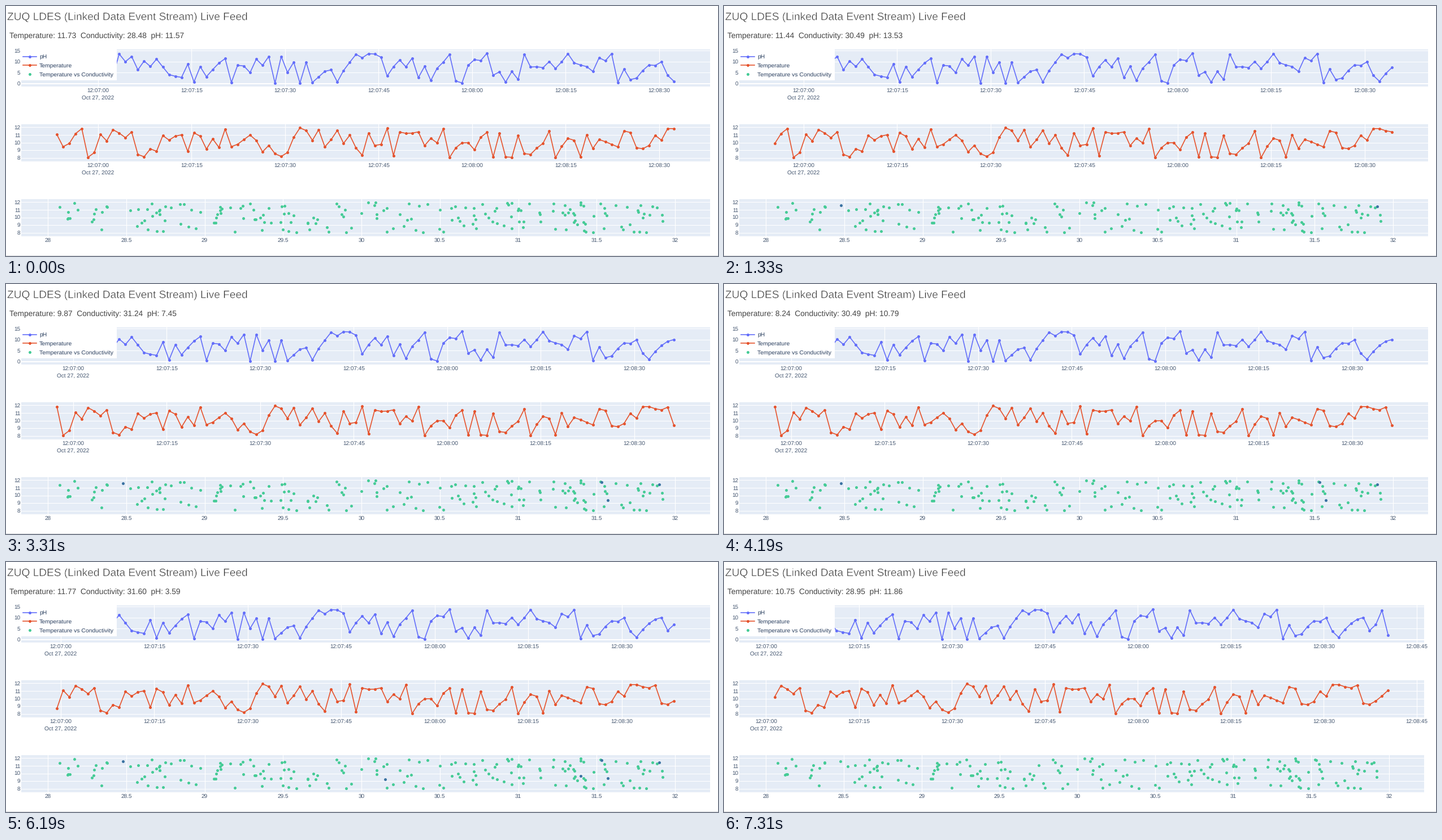
Recreate the animation shown at these times as a matplotlib script. Size 1260 px wide and 444 px high, loop 8000 ms.

```python
import numpy as np
import matplotlib.pyplot as plt
from matplotlib.animation import FuncAnimation
from matplotlib.patches import Rectangle
from matplotlib.patheffects import Stroke

W, H, DPI = 1260, 444, 72
LOOP, STEP = 8000, 20
HISTORY, WINDOW = 192, 100      # readings at the start, readings per line chart
LEFT, RIGHT, DEPTH = 27, 1246, 66
BLUE, RED, GREEN, FRESH = "#636efa", "#e5532d", "#45cb96", "#3a72a2"
PANEL, INK = "#e5ecf6", "#43556f"

plt.rcParams["font.family"] = "Liberation Sans"
plt.rcParams["text.hinting"] = "none"

# Readout: (time in ms, temperature, conductivity, pH)
READOUT = [
    (0, 11.73, 28.48, 11.57), (250, 9.62, 29.15, 6.84),
    (1180, 11.44, 30.49, 13.53), (2320, 11.02, 28.32, 4.33),
    (3180, 9.87, 31.24, 7.45), (4190, 8.24, 30.49, 10.79),
    (5180, 9.44, 29.79, 5.16), (6190, 11.77, 31.60, 3.59),
    (7180, 10.75, 28.95, 11.86)]
PLOT_TIMES = [320, 1330, 2320, 3310, 4320, 5310, 6320, 7310]
REDRAW = 7                      # from this update on, the layout is rebuilt
EDGES = {7: 1228, 8: 1239}

# One reading per second: random history, then the readings that arrive live.
rng = np.random.default_rng(27)


def readings(low, high, live):
    return np.append(rng.uniform(low, high, HISTORY), live)


ph = readings(0.2, 13.8, [4.6, 7.3, 9.2, 10.0, 4.2, 6.8, 13.3, 2.1])
temp = readings(8, 11.95, [11.55, 11.4, 11.75, 9.4, 9.25, 9.7, 10.35, 11.1])
cond = readings(28.05, 32,
                [28.48, 31.9, 31.53, 31.57, 30.15, 31.4, 30.75, 29.75])


def ph_y(v):
    return 138.2 - 3.95 * v


def temp_y(v):
    return 270 - 13.65 * (v - 8)


def scatter_y(v):
    return 403 - 13.7 * (v - 8)


def cond_x(v):
    return 74 + 277.5 * (v - 28)


fig = plt.figure(figsize=(W / DPI, H / DPI), dpi=DPI, facecolor="white")
ax = fig.add_axes([0, 0, 1, 1])
ax.set(xlim=(0, W), ylim=(H, 0))
ax.axis("off")


def label(x, y, s="", size=10, color=INK, ha="center", **kw):
    return ax.text(x, y, s, size=size, color=color, ha=ha, va="baseline",
                   zorder=6, **kw)


def box(x, y, w, h, color, z):
    return ax.add_patch(Rectangle((x, y), w, h, fc=color, lw=0, zorder=z))


def series(color, ls="-", z=3):
    return ax.plot([], [], color=color, ls=ls, lw=1.65, marker="o", ms=5,
                   mew=0, zorder=z)[0]


def panel(top, ticks, to_y):
    """Background with labelled horizontal grid lines."""
    bg = box(LEFT, top, RIGHT - LEFT, DEPTH, PANEL, 0)
    rows = []
    for v in ticks:
        y = to_y(v)
        rows += ax.plot([LEFT, RIGHT], [y, y], color="white",
                        lw=1 if v else 2, zorder=1)
        label(25.5, y + 3.8, str(v), ha="right")
    return bg, rows


def columns(top, names):
    """Vertical grid lines, each with its label below the panel."""
    return [(ax.plot([0, 0], [top, top + DEPTH], color="white", lw=1.2,
                     zorder=1)[0], label(0, top + 77.2, s)) for s in names]


def place(column, x, edge):
    line, name = column
    line.set_xdata([x, x])
    name.set_x(x)
    for part in column:
        part.set_visible(x < edge)


label(2, 25, "ZUQ LDES (Linked Data Event Stream) Live Feed", 19.1, "#333333",
      "left", path_effects=[Stroke(linewidth=0.5, foreground="white")])
info = label(5.5, 57, "", 13.7, "#444444", "left")
box(0, 443, W, 1, "#d8dadd", 0)

panels = [panel(77, range(0, 16, 5), ph_y),
          panel(210, range(8, 13), temp_y),
          panel(343, range(8, 13), scatter_y)]

times = [f"12:{7 + s // 60:02d}:{s % 60:02d}" for s in range(0, 106, 15)]
clocks = [(columns(top, times), label(0, top + 90, "Oct 27, 2022"))
          for top in (77, 210)]
cond_ticks = np.arange(28, 32.1, 0.5)
cond_cols = columns(343, [f"{v:g}" for v in cond_ticks])

ph_line, temp_line = series(BLUE), series(RED)
dots, fresh = series(GREEN, "none"), series(FRESH, "none", 4)

# Legend
box(LEFT, 76, 169, 56, "white", 5)
for y, color, name in [(89.5, BLUE, "pH"), (105.3, RED, "Temperature"),
                       (121, GREEN, "Temperature vs Conductivity")]:
    if color != GREEN:
        ax.plot([30, 54], [y, y], color=color, lw=1.65, zorder=6)
    ax.plot([42], [y], "o", color=color, ms=5, mew=0, zorder=6)
    label(59, y + 3.7, name, 10.35, "#2a3f5f", "left")


def update(n):
    t = n * STEP + STEP - 1
    _, t_now, c_now, p_now = [r for r in READOUT if r[0] <= t][-1]
    info.set_text(f"Temperature: {t_now:.2f}  Conductivity: {c_now:.2f}"
                  f"  pH: {p_now:.2f}")

    k = sum(t >= p for p in PLOT_TIMES)
    edge = EDGES.get(k, RIGHT)
    scale = (edge - LEFT) / (RIGHT - LEFT)

    def fit(x):
        return LEFT + (x - LEFT) * scale

    for bg, rows in panels:
        bg.set_width(edge - LEFT)
        for row in rows:
            row.set_xdata([LEFT, edge])

    for cols, date in clocks:
        for j, col in enumerate(cols):
            place(col, fit(163 + 11.03 * (15 * j - k)), edge)
        date.set_x(fit(163 - 11.03 * k))
    for v, col in zip(cond_ticks, cond_cols):
        place(col, fit(cond_x(v)), edge)

    end = HISTORY + k
    xs = fit(90 + 11.03 * np.arange(WINDOW))
    ph_line.set_data(xs, ph_y(ph[end - WINDOW:end]))
    temp_line.set_data(xs, temp_y(temp[end - WINDOW:end]))

    settled = end if k >= REDRAW else HISTORY
    px, py = fit(cond_x(cond)), scatter_y(temp)
    dots.set_data(px[:settled], py[:settled])
    fresh.set_data(px[settled:end], py[settled:end])
    return []


anim = FuncAnimation(fig, update, frames=LOOP // STEP, interval=STEP,
                     repeat=True, repeat_delay=0)
plt.show()
```
